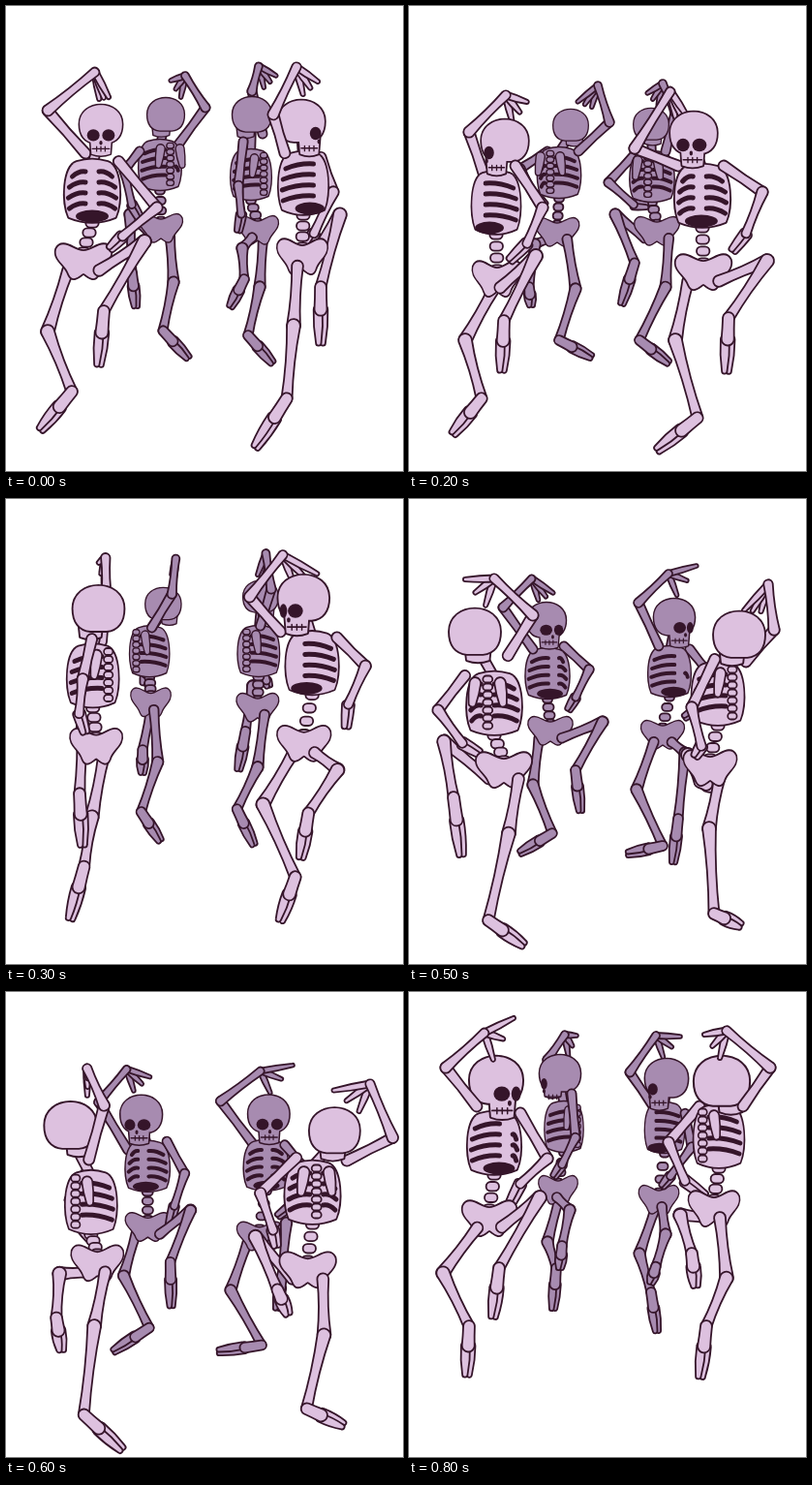
These frames come from a looping animation (410x480 px, 900 ms). An HTML page:

```html
<!DOCTYPE html>
<html lang="en">
<head>
<meta charset="utf-8">
<title>Dancing skeletons</title>
<style>
html, body { margin: 0; width: 100%; height: 100%; overflow: hidden; background: #fff; }
svg { display: block; width: 410px; height: 480px; }
</style>
</head>
<body>
<svg id="stage" viewBox="0 0 410 480"></svg>
<script>
const INK = '#35152a', STEPS = 9, STEP_MS = 100;

// front: the step at which a dancer faces the viewer while turning once per loop
const dancer = (size, fill, front) => ({ size, fill, front, poses: [] });
const backLeft = dancer(0.8, '#a78bb0', 5.6);
const backRight = dancer(0.8, '#a78bb0', 6.1);
const frontLeft = dancer(1, '#ddc1df', 0);
const frontRight = dancer(1, '#ddc1df', 1.8);

// core: skull, ribs, pelvis; arms: shoulder, elbow, wrist, tip; legs: knee, ankle, toe
function pose(who, step, skull, core, armA, armB, legA, legB) {
  who.poses.push({ step, v: [skull, ...core, ...armA, ...armB, ...legA, ...legB] });
}

pose(frontLeft, 0, 21, [98,122, 89,192, 80,262], [82,152, 43,108, 92,68, 106,94], [116,160, 156,208, 120,238, 108,250], [43,336, 68,398, 36,437], [143,243, 101,315, 96,370]);
pose(frontLeft, 2, 23, [99,139, 90,204, 91,280], [78,176, 62,130, 100,92, 122,99], [110,165, 138,208, 122,245, 105,262], [58,345, 75,405, 46,441], [131,258, 98,325, 96,376]);
pose(frontLeft, 4, 26, [86,103, 89,178, 95,243], [112,132, 134,90, 100,46, 69,50], [68,142, 32,181, 42,215, 65,232], [110,322, 84,378, 92,435], [38,224, 55,292, 62,348]);
pose(frontLeft, 5, 25, [68,137, 88,212, 98,278], [102,162, 128,120, 88,82, 58,83], [58,182, 30,218, 55,252, 72,262], [103,345, 82,435, 118,460], [36,250, 46,308, 54,367]);
pose(frontLeft, 7, 26, [76,118, 88,199, 88,258], [72,160, 67,98, 82,58, 113,70], [112,165, 113,192, 102,215, 100,233], [70,325, 75,400, 99,455], [90,295, 69,340, 69,358]);
pose(frontLeft, 8, 26, [90,91, 88,157, 83,232], [70,118, 38,78, 78,42, 108,27], [115,125, 143,172, 115,198, 103,222], [35,290, 62,345, 60,395], [135,212, 93,285, 87,335]);

pose(backLeft, 0, 18, [165,112, 159,165, 160,228], [178,143, 206,105, 185,72, 170,77], [138,150, 122,170, 130,205, 140,222], [173,285, 162,335, 188,363], [128,215, 130,275, 134,310]);
pose(backLeft, 2, 17, [167,123, 155,173, 153,232], [175,150, 207,120, 195,82, 174,99], [143,150, 115,168, 130,195, 140,205], [172,292, 155,345, 188,362], [130,246, 124,290, 126,309]);
pose(backLeft, 4, 18, [154,103, 143,155, 147,202], [130,128, 130,88, 150,54, 163,69], [163,138, 173,158, 160,180, 150,190], [140,265, 133,315, 130,350], [178,185, 160,245, 160,278]);
pose(backLeft, 5, 19, [142,125, 143,181, 146,238], [128,155, 97,112, 127,82, 149,97], [160,152, 186,176, 172,205, 165,217], [128,295, 148,345, 115,365], [200,230, 172,280, 177,322]);
pose(backLeft, 7, 21, [145,111, 152,164, 149,225], [130,148, 115,98, 138,62, 158,63], [172,140, 177,182, 168,216, 163,240], [125,275, 145,325, 122,360], [172,210, 162,265, 158,305]);
pose(backLeft, 8, 20, [156,84, 160,140, 154,203], [147,105, 143,70, 161,44, 173,45], [168,105, 172,150, 158,178, 150,190], [143,258, 152,285, 149,327], [166,225, 158,262, 156,285]);

pose(backRight, 0, 19, [254,112, 253,175, 260,230], [265,132, 254,88, 261,62, 279,72], [245,140, 240,185, 243,215, 240,232], [262,290, 250,340, 275,368], [244,250, 246,282, 232,310]);
pose(backRight, 2, 17, [250,122, 251,177, 256,231], [265,150, 275,110, 262,80, 246,90], [236,150, 206,182, 232,205, 245,206], [265,290, 238,345, 268,368], [213,215, 233,265, 220,307]);
pose(backRight, 4, 18, [274,93, 269,152, 263,211], [260,124, 262,85, 272,46, 280,68], [288,128, 305,138, 300,185, 290,195], [250,275, 246,315, 241,352], [290,200, 265,250, 262,288]);
pose(backRight, 5, 20, [274,122, 269,179, 262,242], [258,152, 237,107, 268,77, 297,69], [290,155, 310,180, 300,215, 285,225], [235,300, 262,358, 226,366], [285,262, 278,330, 273,375]);
pose(backRight, 7, 20, [268,112, 267,164, 261,240], [252,143, 218,104, 258,68, 287,73], [285,145, 300,165, 290,205, 275,220], [235,298, 258,345, 228,366], [288,208, 280,240, 275,262]);
pose(backRight, 8, 21, [266,89, 264,141, 258,213], [252,118, 228,83, 255,45, 280,46], [285,125, 292,160, 270,190, 262,200], [238,270, 250,310, 256,350], [265,250, 255,283, 250,300]);

pose(frontRight, 0, 23, [305,119, 307,184, 306,257], [288,152, 276,112, 300,63, 322,78], [325,156, 338,192, 318,235, 310,248], [297,330, 290,405, 258,455], [345,215, 325,290, 325,348]);
pose(frontRight, 2, 23, [294,131, 303,197, 304,273], [278,165, 233,147, 270,88, 288,115], [325,165, 365,192, 348,235, 335,252], [275,345, 298,425, 257,458], [370,263, 330,322, 328,377]);
pose(frontRight, 4, 26, [325,94, 325,162, 311,243], [305,128, 299,80, 320,46, 350,62], [345,135, 352,172, 341,210, 345,232], [273,303, 303,378, 315,422], [310,282, 298,315, 294,345]);
pose(frontRight, 5, 25, [341,140, 319,202, 311,276], [348,168, 377,135, 371,88, 346,115], [316,165, 292,215, 302,255, 296,265], [310,340, 315,428, 342,440], [288,264, 300,292, 318,298]);
pose(frontRight, 7, 25, [330,121, 317,188, 313,268], [342,155, 390,130, 355,76, 325,64], [295,155, 257,178, 268,215, 285,238], [333,340, 303,398, 334,435], [246,243, 268,315, 266,362]);
pose(frontRight, 8, 27, [323,92, 320,150, 315,222], [345,118, 373,78, 328,40, 305,44], [300,118, 268,155, 285,195, 305,210], [328,295, 307,345, 301,397], [280,230, 292,270, 296,303]);

const mix = (p, q, k) => [p[0] + (q[0] - p[0]) * k, p[1] + (q[1] - p[1]) * k];
const path = (d, attrs = '') => `<path d="${d}" ${attrs}/>`;
const line = (d, width) => path(d, `fill="none" stroke-width="${width}" stroke-linecap="round"`);
const blob = (x, y, rx, ry) =>
  `<ellipse cx="${x}" cy="${y}" rx="${rx}" ry="${ry}" fill="${INK}" stroke="none"/>`;
const place = ([x, y], sx, sy, body) =>
  `<g transform="translate(${x} ${y}) scale(${sx} ${sy})">${body}</g>`;

function normal(p, q) {
  const dx = q[0] - p[0], dy = q[1] - p[1], len = Math.hypot(dx, dy) || 1;
  return [-dy / len, dx / len];
}

// A shaft with round ends of radius a and b, pulled in to c halfway
function bone(p, q, a, c, b = a) {
  const n = normal(p, q), m = mix(p, q, 0.5);
  const at = (o, k) => (o[0] + n[0] * k).toFixed(1) + ' ' + (o[1] + n[1] * k).toFixed(1);
  return path(`M${at(p, a)}Q${at(m, c)} ${at(q, b)}A${b} ${b} 0 0 0 ${at(q, -b)}` +
    `Q${at(m, -c)} ${at(p, -a)}A${a} ${a} 0 0 0 ${at(p, a)}Z`);
}

function digits(p, q, gap, a, c, b) {
  const n = normal(p, q), shift = (o, k) => [o[0] + n[0] * k, o[1] + n[1] * k];
  return [-gap, gap].map(k => bone(shift(p, k), shift(q, k * 0.8), a, c, b)).join('');
}

function arm([shoulder, elbow, wrist, tip], s, raised) {
  let hand;
  if (raised) {
    const down = [wrist[0] + (tip[0] - wrist[0]) * 0.3, wrist[1] + 28 * s];
    hand = [down, mix(tip, down, 0.5), tip].map(f => bone(wrist, f, 2.6 * s, 3 * s, 1.2 * s)).join('');
  } else {
    hand = digits(wrist, tip, 2.6 * s, 3 * s, 3 * s, 2 * s);
  }
  return bone(shoulder, elbow, 4.6 * s, 3 * s) + hand + bone(elbow, wrist, 4.8 * s, 2 * s, 3.8 * s);
}

function leg(hip, [knee, ankle, toe], s) {
  const ball = mix(ankle, toe, 0.4);
  return bone(hip, knee, 5 * s, 2.6 * s, 6 * s) + bone(knee, ankle, 6 * s, 2.2 * s, 4.6 * s) +
    digits(ball, toe, 2.8 * s, 3.6 * s, 4.4 * s, 1.8 * s) + bone(ankle, ball, 5 * s, 5 * s, 5.6 * s);
}

function ribs(yaw) {
  const facing = Math.cos(yaw) > 0, mid = 20 * Math.sin(yaw) * (facing ? 1 : -1);
  let out = path('M-16-31Q0-36 16-31C30-26 31 10 24 26Q0 36-24 26C-31 10-30-26-16-31Z');
  if (facing) out += blob(mid * 0.4, 25, 17, 6.5);
  for (let y = -20; y < 20; y += 11) {
    const half = 24.5 - ((y - 2) / 11) ** 2;
    for (const side of [-1, 1]) {
      const inner = mid + side * 7, outer = side * half;
      if ((outer - inner) * side > 3)
        out += line(`M${inner} ${y - 1}Q${(inner + outer) / 2} ${y - 2} ${outer} ${y + 4}`, 5);
    }
  }
  if (!facing) {
    for (const side of [-1, 1]) {
      const x = mid + side * 13;
      if (Math.abs(x) < 27) out += bone([x, -22], [x + side * 3, -1], 5, 5, 3);
    }
    for (let y = -26; y < 30; y += 8) out += bone([mid - 1.5, y], [mid + 1.5, y], 2.6, 2.6);
  }
  return out;
}

function skull(yaw) {
  const c = Math.cos(yaw), s = Math.sin(yaw), x = 9 * s, w = 11 + 2 * Math.abs(c);
  const low = c > 0 ? 35 : 28;
  const head = 'M-25 0C-25-30 25-30 25 0C25 13 19 21 8 22H-8C-19 21-25 13-25 0Z';
  const jaw = `M${x - w} 10H${x + w}L${x + w - 2} ${low}Q${x} ${low + 4} ${x - w + 2} ${low}Z`;
  if (c < -0.15) return path(jaw) + path(head);
  let out = path(head + jaw);
  for (const turn of [-0.44, 0.44]) {
    const depth = Math.cos(yaw + turn);
    if (depth > 0.1) out += blob(21 * Math.sin(yaw + turn), 13, 2 + 6 * depth, 7);
  }
  out += blob(x + 11 * s, 22, 1.8, 2.6);
  out += line(`M${x - w + 3} 29H${x + w - 3}`, 1.6);
  for (let k = -1; k < 2; k++) out += line(`M${x + k * 5} 26.5v5.5`, 1.4);
  return out;
}

const PELVIS = 'M-28-11C-22-23-9-9 0-9C9-9 22-23 28-11C31 0 18 5 15 15C11 24 4 16 0 14' +
  'C-4 16-11 24-15 15C-18 5-31 0-28-11Z';

// Passes a cubic through the four surrounding key poses
function poseAt({ poses }, step) {
  const hit = poses.find(p => p.step === step);
  if (hit) return hit.v;
  const n = poses.length, next = poses.findIndex(p => p.step > step);
  const keys = [-2, -1, 0, 1].map(k => {
    const i = next + k;
    return { t: poses[(i + n) % n].step + Math.floor(i / n) * STEPS, v: poses[(i + n) % n].v };
  });
  const weights = keys.map(a =>
    keys.reduce((w, b) => a === b ? w : w * (step - b.t) / (a.t - b.t), 1));
  return hit || keys[0].v.map((_, i) => keys.reduce((sum, k, j) => sum + k.v[i] * weights[j], 0));
}

function skeleton(who, step) {
  const [r, ...v] = poseAt(who, step), pts = [];
  for (let i = 0; i < v.length; i += 2) pts.push([v[i], v[i + 1]]);
  const [head, chest, pelvis] = pts, s = who.size;
  const yaw = (who.front - step) / STEPS * 2 * Math.PI;
  const sin = Math.sin(yaw), cos = Math.cos(yaw), wide = 0.85 + 0.15 * Math.abs(cos);
  const hip = side => [pelvis[0] + side * 16 * s * cos, pelvis[1] + 11 * s];

  let spine = bone(mix(head, chest, 0.3), [chest[0], chest[1] - 28 * s], 4 * s, 4 * s);
  const top = [chest[0], chest[1] + 32 * s], base = [pelvis[0], pelvis[1] - 8 * s];
  for (let i = 0; i < 4; i++) {
    const [x, y] = mix(top, base, i / 3);
    spine += bone([x - 2 * s, y], [x + 2 * s, y], 3.8 * s, 3.8 * s);
  }
  const parts = [
    [-0.05, spine],
    [0, place(pelvis, s * wide, s, path(PELVIS))],
    [0.05, place(chest, s * wide, s, ribs(yaw))],
    [0.1, place(head, r / 24, r / 24, skull(yaw))],
    [sin - 0.2, arm(pts.slice(3, 7), s, true)],
    [0.3 - sin, arm(pts.slice(7, 11), s, false)],
    [0.5 * sin - 0.3 * cos, leg(hip(-1), pts.slice(11, 14), s)],
    [cos - 0.5 * sin, leg(hip(1), pts.slice(14, 17), s)]
  ];
  parts.sort((a, b) => a[0] - b[0]);
  return `<g fill="${who.fill}" stroke="${INK}" stroke-width="3.6" stroke-linejoin="round" ` +
    `paint-order="stroke">${parts.map(p => p[1]).join('')}</g>`;
}

const stage = document.getElementById('stage');
const start = performance.now();
let shown = -1;

function draw() {
  const step = Math.floor((performance.now() - start) / STEP_MS) % STEPS;
  if (step !== shown) {
    shown = step;
    stage.innerHTML = [backLeft, backRight, frontLeft, frontRight]
      .map(who => skeleton(who, step)).join('');
  }
  requestAnimationFrame(draw);
}
draw();
</script>
</body>
</html>
```
